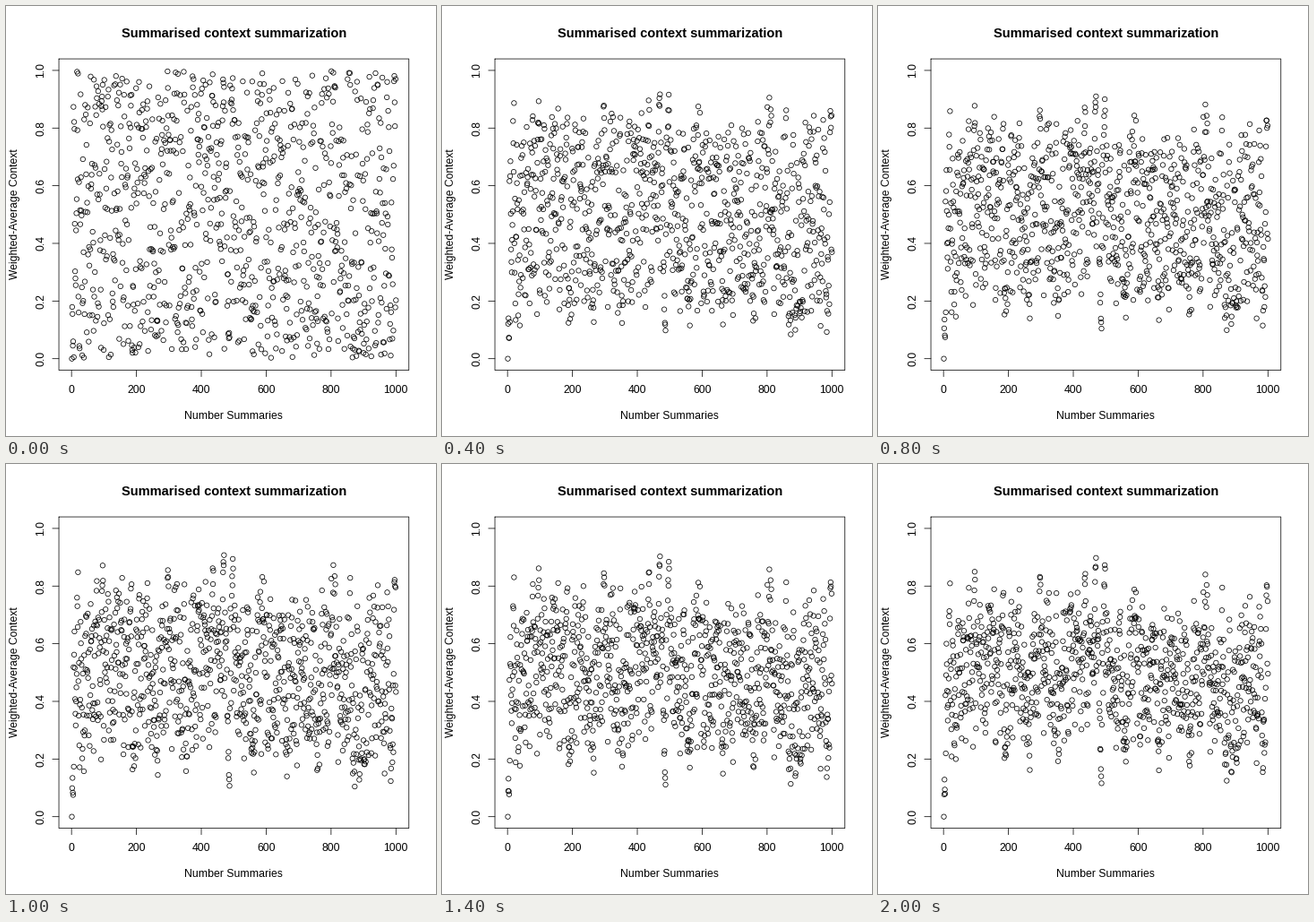
These frames come from a looping animation (480x480 px, 2.1 s). A matplotlib script:

```python
import numpy as np
import matplotlib.pyplot as plt
from matplotlib.animation import FuncAnimation

SIZE, DPI = 480, 100
PX = 72 / DPI  # one pixel in points
STROKE = .75 * PX
COUNT, FRAMES, INTERVAL = 1000, 21, 100
LEFT, RIGHT, TOP, BOTTOM = 59.04, 449.76, 59.04, 406.56
TICK = 7.2
DECAY = .65

# Positions where a short run of values stays high or low
HIGHS = (97, 437, 470, 498)
LOWS = (5, 487, 904, 985)
RUN = 5


def make_values():
    values = np.random.default_rng(7).random(COUNT)
    for end in HIGHS:
        values[end - RUN:end] = .8 + .2 * values[end - RUN:end]
    for end in LOWS:
        values[end - RUN:end] *= .2
    values[0] = 0
    return values


def make_context(values):
    """Fading average of the values before each one."""
    context = np.zeros(COUNT)
    total = weight = 0
    for i in range(1, COUNT):
        total = values[i - 1] + DECAY * total
        weight = 1 + DECAY * weight
        context[i] = total / weight
    return context


def to_x(v):
    return 73.15 + v * .36215


def to_y(v):
    return 393.69 - v * 321.78


raw = make_values()
context = make_context(raw)


def blend(step):
    share = .2 * step ** .35
    return (1 - share) * raw + share * context


fig = plt.figure(figsize=(SIZE / DPI, SIZE / DPI), dpi=DPI, facecolor="white")
ax = fig.add_axes([0, 0, 1, 1])
ax.set(xlim=(0, SIZE), ylim=(SIZE, 0))
ax.axis("off")


def line(xs, ys):
    ax.plot(xs, ys, color="black", lw=STROKE, snap=False,
            solid_capstyle="round")


def label(x, y, text, size=12.2, **style):
    ax.text(x, y, text, fontsize=size * PX, family="Liberation Sans",
            ha="center", va="baseline", rotation_mode="anchor", **style)


line([LEFT, RIGHT, RIGHT, LEFT, LEFT], [TOP, TOP, BOTTOM, BOTTOM, TOP])
for i in range(6):
    x, y = to_x(200 * i), to_y(.2 * i)
    line([x, x], [BOTTOM, BOTTOM + TICK])
    line([LEFT - TICK, LEFT], [y, y])
    label(x, 432.5, str(200 * i))
    label(42.5, y, f"{.2 * i:.1f}", rotation=90)

label(254.4, 35, "Summarised context summarization", 14.6, weight="bold")
label(254.4, 461.3, "Number Summaries")
label(13, 232.4, "Weighted-Average Context", 12.1, rotation=90)

xs = to_x(np.arange(1, COUNT + 1))
dots = ax.scatter(xs, to_y(raw), s=(5.4 * PX) ** 2, facecolors="none",
                  edgecolors="black", linewidths=STROKE, zorder=3)


def update(step):
    dots.set_offsets(np.column_stack([xs, to_y(blend(step))]))
    return dots,


anim = FuncAnimation(fig, update, frames=FRAMES, interval=INTERVAL,
                     repeat=True, repeat_delay=0)
plt.show()
```
